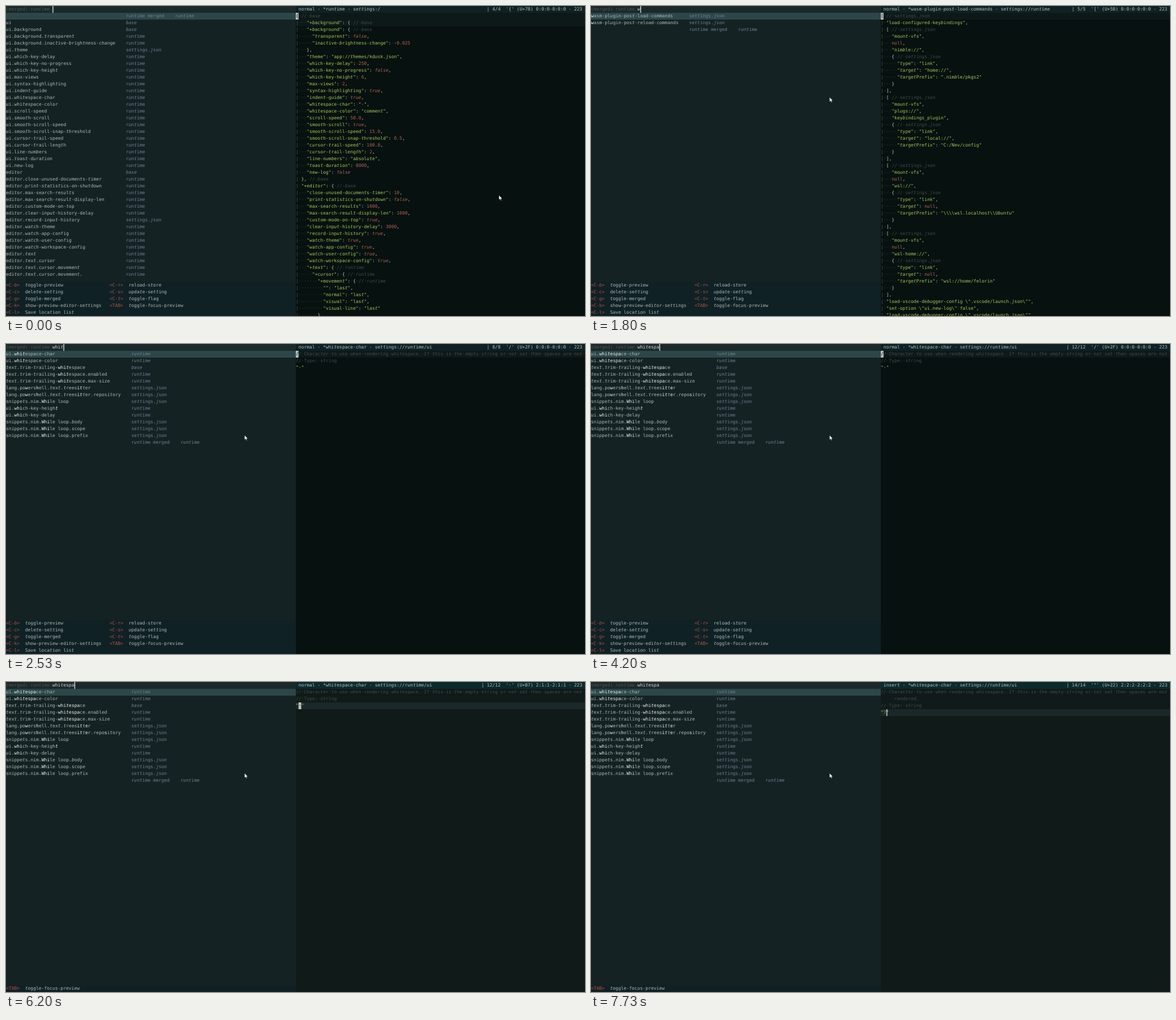
Write an HTML page that moves like this. It is 1023 px wide and 547 px high and loops after 8 s.

```html
<!DOCTYPE html>
<html lang="en">
<head>
<meta charset="utf-8">
<title>Settings browser</title>
<style>
html, body { margin: 0; width: 100%; height: 100%; overflow: hidden; background: #07110f; }
svg { display: block; width: 1023px; height: 547px; }
text { font: 8px "DejaVu Sans Mono", monospace; white-space: pre; text-rendering: geometricPrecision; }
.i { font-style: italic; }
</style>
</head>
<body>
<svg id="stage" viewBox="0 0 1023 547" xmlns="http://www.w3.org/2000/svg"></svg>
<script>
const LOOP = 8000, CW = 4.816, RH = 12, SPLIT = 512, W = 1023, H = 547;
const C = {
  text: '#aebab7', bright: '#f0f5f4', dim: '#4b5756', source: '#6d8294', key: '#b5523f',
  code: '#bcc6c2', string: '#a5c95c', value: '#b8605a', comment: '#414c4b', dot: '#36423f',
  head: '#b3c2c1', block: '#b9c3c1', dark: '#0a1414', caret: '#e4ebe9'
};

const lines = s => s.split('\n').slice(1, -1);
const esc = s => s.replace(/&/g, '&amp;').replace(/</g, '&lt;');
const slant = s => s.split(/([tubj]+)/)
  .map((p, i) => i % 2 ? `<tspan class="i">${p}</tspan>` : esc(p)).join('');
const run = (s, fill, italic) => s
  ? `<tspan fill="${fill}"${italic ? ' class="i"' : ''}>${italic ? esc(s) : slant(s)}</tspan>` : '';
const text = (x, top, body) => `<text x="${x.toFixed(2)}" y="${top + 8}" xml:space="preserve">${body}</text>`;
const rect = (x, y, w, h, fill) => `<rect x="${x}" y="${y}" width="${w}" height="${h}" fill="${fill}"/>`;
const caret = (x, y) => rect(x + 0.4, y, 1.3, RH, C.caret);

const startList = lines(`

ui
ui.background
ui.background.transparent
ui.background.inactive-brightness-change
ui.theme
ui.which-key-delay
ui.which-key-no-progress
ui.which-key-height
ui.max-views
ui.syntax-highlighting
ui.indent-guide
ui.whitespace-char
ui.whitespace-color
ui.scroll-speed
ui.smooth-scroll
ui.smooth-scroll-speed
ui.smooth-scroll-snap-threshold
ui.cursor-trail-speed
ui.cursor-trail-length
ui.line-numbers
ui.toast-duration
ui.new-log
editor
editor.close-unused-documents-timer
editor.print-statistics-on-shutdown
editor.max-search-results
editor.max-search-result-display-len
editor.custom-mode-on-top
editor.clear-input-history-delay
editor.record-input-history
editor.watch-theme
editor.watch-app-config
editor.watch-user-config
editor.watch-workspace-config
editor.text
editor.text.cursor
editor.text.cursor.movement
editor.text.cursor.movement.
`);
const trim = ['', '.enabled', '.max-size'].map(s => 'text.trim-trailing-whitespace' + s);
const loops = ['', '.body', '.scope', '.prefix'].map(s => 'snippets.nim.While loop' + s);
const spaceKeys = ['ui.whitespace-char', 'ui.whitespace-color'];
const wasmList = ['wasm-plugin-post-load-commands', 'wasm-plugin-post-reload-commands', ''];
const whichList = ['ui.which-key-delay', 'ui.which-key-height', 'ui.which-key-no-progress',
  ...spaceKeys, ...trim, ...loops, ''];
const whiteList = [...spaceKeys, ...trim, 'lang.powershell.text.treesitter',
  'lang.powershell.text.treesitter.repository', loops[0], 'ui.which-key-height',
  'ui.which-key-delay', ...loops.slice(1), ''];

const startCode = lines(`
{ // base
    "+background": { // base
    "+background": { // base
      "transparent": false,
      "inactive-brightness-change": -0.025
    },
    "theme": "app://themes/kdusk.json",
    "which-key-delay": 250,
    "which-key-no-progress": false,
    "which-key-height": 6,
    "max-views": 2,
    "syntax-highlighting": true,
    "indent-guide": true,
    "whitespace-char": "·",
    "whitespace-color": "comment",
    "scroll-speed": 50.0,
    "smooth-scroll": true,
    "smooth-scroll-speed": 15.0,
    "smooth-scroll-snap-threshold": 0.5,
    "cursor-trail-speed": 100.0,
    "cursor-trail-length": 2,
    "line-numbers": "absolute",
    "toast-duration": 8000,
    "new-log": false
  }, // base
  "+editor": { // base
    "close-unused-documents-timer": 10,
    "print-statistics-on-shutdown": false,
    "max-search-results": 1000,
    "max-search-result-display-len": 1000,
    "custom-mode-on-top": true,
    "clear-input-history-delay": 3000,
    "record-input-history": true,
    "watch-theme": true,
    "watch-app-config": true,
    "watch-user-config": true,
    "watch-workspace-config": true,
    "+text": { // runtime
      "+cursor": { // runtime
        "+movement": { // runtime
          "": "last",
          "normal": "last",
          "visual": "last",
          "visual-line": "last"
        },
`);

const mount = (name, path, target, prefix) => [
  '  [ // settings.json', '    "mount-vfs",', `    ${name},`, `    "${path}",`,
  '    { // settings.json', '      "type": "link",', `      "target": ${target},`,
  `      "targetPrefix": "${prefix}"`, '    }', '  ],'];
const wasmCode = [
  '[ // settings.json', '  "load-configured-keybindings",',
  ...mount('null', 'nimble://', '"home://"', '.nimble/pkgs2'),
  ...mount('"plugs://"', 'keybindings_plugin', '"local://"', 'C:/Nev/config'),
  ...mount('null', 'wsl://', 'null', String.raw`\\\\wsl.localhost\\Ubuntu`),
  ...mount('null', 'wsl-home://', 'null', 'wsl://home/felorin'),
  String.raw`  "load-vscode-debugger-config \".vscode/launch.json\"",`,
  String.raw`  "set-option \"ui.new-log\" false",`,
  String.raw`  "load-vscode-debugger-config \".vscode/launch.json\""`
];
const whichCode = ['// Time in milliseconds after a key press until the which key window opens.',
  '// Type: int', '250'];
const about = '// Character to use when rendering whitespace. If this is the empty string or not set then spaces are not';
const charCode = [about + ' ', '// Type: string', '"·"'];

const hints = [
  ['<C-b>', 'toggle-preview', '<C-r>', 'reload-store'],
  ['<C-c>', 'delete-setting', '<C-s>', 'update-setting'],
  ['<C-g>', 'toggle-merged', '<C-t>', 'toggle-flag'],
  ['<C-k>', 'show-preview-editor-settings', '<TAB>', 'toggle-focus-preview'],
  ['<C-l>', 'Save location list']];
const tabHint = [['<TAB>', 'toggle-focus-preview']];
const charHint = [['<ESC>', 'cancel'], ['<CHAR>', 'replace-selected-characters']];

// Value of the last [time, value] step reached.
const at = (t, steps) => steps.reduce((v, s) => t >= s[0] ? s[1] : v, steps[0][1]);
const blinks = [1330, 1730, 3670, 4200, 4670, 5200, 5730, 6200, 6730, 7200, 7730];

function state(t) {
  const typed = at(t, [[0, 0], [1730, 1], [2270, 2], [2330, 3], [2470, 4], [2670, 5], [3000, 6], [3070, 7], [3130, 8]]);
  const edits = at(t, [[0, 4], [1800, 5], [2330, 7], [2530, 8], [2670, 9], [3000, 10], [3070, 11],
    [3200, 12], [7200, 13], [7530, 14]]);
  const insert = t >= 7200;
  const [name, path, code] = at(t, [
    [0, ['runtime', 'settings:/', startCode]],
    [1800, ['wasm-plugin-post-load-commands', 'settings://runtime', wasmCode]],
    [2330, ['which-key-delay', 'settings://runtime/ui', whichCode]],
    [2530, ['whitespace-char', 'settings://runtime/ui', charCode]],
    [7200, ['whitespace-char', 'settings://runtime/ui', [about, '     rendered.', '// Type: string', '""']]],
    [7530, ['whitespace-char', 'settings://runtime/ui', [about, '     rendered.', '// Type: string', '"?"']]]]);
  const line = at(t, [[0, 0], [4870, 1], [5000, 2]]);
  const col = at(t, [[0, 0], [5730, 1], [7530, 2]]);
  const row = line + (insert ? 1 : 0);
  return {
    query: 'whitespa'.slice(0, typed),
    list: at(t, [[0, startList], [1730, wasmList], [2270, whichList], [2470, whiteList]]),
    caret: blinks.filter(b => t >= b).length % 2 === 0,
    panel: at(t, [[0, hints], [4400, tabHint], [6270, []], [6530, charHint], [7000, tabHint]]),
    focus: t >= 4400,
    shown: !(t >= 5400 && t < 5730 || t >= 6270 && t < 6800),
    glow: t < 1800 ? 2 : 1,
    insert, edits, name, path, code, line, col, row
  };
}

function origin(name) {
  if (['ui', 'ui.background', 'editor', trim[0]].includes(name)) return 'base';
  return /^(lang|snippets|wasm)|^ui\.theme|record-input/.test(name) ? 'settings.json' : 'runtime';
}

// Brightens the letters of the query found in order.
function matched(name, query) {
  const hits = new Set();
  let from = 0;
  for (const ch of query) {
    const i = name.toLowerCase().indexOf(ch, from);
    if (i < 0) break;
    hits.add(i);
    from = i + 1;
  }
  return [...name].map((ch, i) => run(ch, hits.has(i) ? C.bright : C.text)).join('');
}

const spaced = (s, fill, italic) => s.split(/( +)/)
  .map(p => p[0] === ' ' ? run('·'.repeat(p.length), C.dot) : run(p, fill, italic)).join('');

function codeLine(s) {
  if (s.startsWith('     r')) return run('    ', C.dot) + spaced(s.slice(4), C.comment);
  const guide = s[0] === ' ' ? run('|', C.dim) : '';
  const parts = (guide ? s.slice(1) : s).match(/\/\/.*|"(?:\\.|[^"\\])*"|true|false|null|\d[\d.]*| +|./g);
  return guide + parts.map(p => {
    if (p.startsWith('//')) return spaced(p, C.comment);
    if (p[0] === '"') return spaced(p, C.string);
    if (/^(true|false)/.test(p)) return run(p, C.value, true);
    return spaced(p, /^[\dn]/.test(p) ? C.value : C.code);
  }).join('');
}

function leftPane(s) {
  const top = H - s.panel.length * RH;
  const col = (Math.max(...s.list.map(n => n.length)) + 4) * CW;
  let out = rect(0, 0, SPLIT, H, '#152223') + rect(0, 0, SPLIT, RH, '#1b2929') +
    rect(0, RH, SPLIT, RH, '#2c4749') +
    text(0, 0, run('(merged) runtime.', C.dim) + run(s.query, '#d0d9d7'));
  s.list.forEach((name, i) => {
    const y = (i + 1) * RH, src = origin(name);
    if (name) out += text(0, y, matched(name, s.query));
    out += text(col, y, name ? run(src, C.source, src === 'base') : run('runtime merged    runtime', C.source));
  });
  if (s.caret) out += caret((17 + s.query.length) * CW, 0);
  out += rect(0, top, SPLIT, H - top, '#102126');
  s.panel.forEach((hint, i) => hint.forEach((word, k) => {
    out += text([0, 7, 38, 45][k] * CW, top + i * RH, run(word, k % 2 ? C.text : C.key));
  }));
  return out;
}

function rightPane(s) {
  const ch = s.code[s.row][s.col];
  const hex = ch.charCodeAt(0).toString(16).toUpperCase();
  const pos = [s.line, s.col, s.col].join(':');
  const status = `| ${s.edits}/${s.edits}  '${ch}' (U+${hex}) ${pos}-${pos} - 223`;
  const x = SPLIT + s.col * CW, y = (s.row + 1) * RH;
  let out = rect(SPLIT, 0, W - SPLIT, H, s.focus ? '#101a18' : '#07110f') +
    rect(SPLIT, 0, W - SPLIT, RH, s.focus ? '#0c2a2c' : '#0f2124') +
    rect(SPLIT, y, W - SPLIT, s.glow * RH, s.focus ? '#192828' : '#0d1919') +
    text(SPLIT + CW, 0, run(`${s.insert ? 'insert' : 'normal'} - *${s.name} - ${s.path}`, C.head)) +
    text(W - (status.length + 1) * CW, 0, run(status, C.head));
  s.code.forEach((l, i) => { out += text(SPLIT, (i + 1) * RH, codeLine(l)); });
  if (s.insert) out += caret(x, y);
  else if (s.shown) out += rect(x, y, CW, RH, C.block) + text(x, y, run(ch, C.dark));
  return out;
}

function pointer(t) {
  const tick = Math.floor((t + 4) / (200 / 3));
  let x, y;
  if (tick < 7) {
    const u = tick / 6, k = u * u * (3 - 2 * u);
    x = 871 - 415 * k;
    y = 334 - 322 * k;
  } else if (tick < 15) {
    return '';
  } else {
    const k = Math.min(1, (tick - 15) / 2);
    x = 408 + 13.5 * k;
    y = 87 + 74 * k;
  }
  return `<path transform="translate(${x} ${y})" d="M0 0V8L1.9 6.3L3.3 9.2L4.5 8.7L3.2 5.9H5.7Z"
    fill="#fff" stroke="#101818" stroke-width=".4"/>`;
}

const stage = document.getElementById('stage');
let last = '';
function draw(t) {
  const s = state(t);
  const html = rightPane(s) + leftPane(s) + pointer(t);
  if (html !== last) stage.innerHTML = last = html;
}

const start = performance.now();
function loop(now) {
  draw(Math.max(0, now - start) % LOOP);
  requestAnimationFrame(loop);
}
draw(0);
requestAnimationFrame(loop);
</script>
</body>
</html>
```
